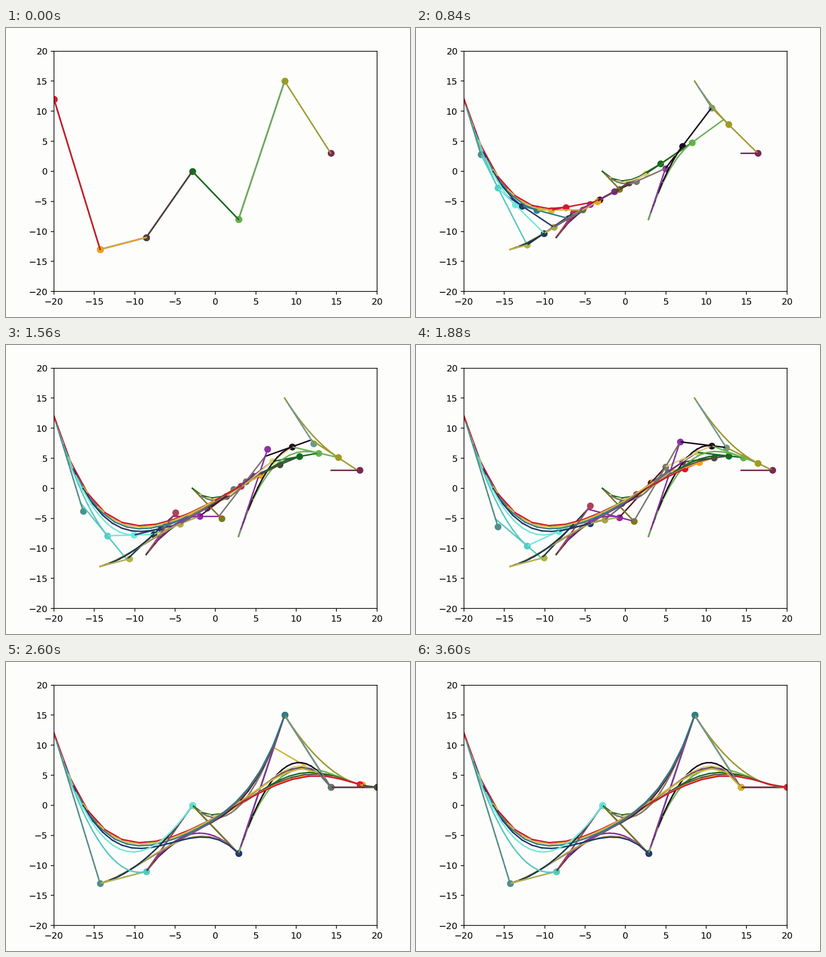
A matplotlib script for the animation above (3.64 s loop, 884x633 px).

```python
import numpy as np
import matplotlib.pyplot as plt
from matplotlib.animation import FuncAnimation
from matplotlib.collections import LineCollection
from matplotlib.colors import to_rgb

W, H, DPI = 884, 633, 128
SCALE = 1.1137          # point sizes relative to the default style
LINE_WIDTH = 1.6 * SCALE
FRAMES, INTERVAL = 91, 40
STEPS = 20              # values of t from 0 to 1

CONTROL = np.column_stack([np.linspace(-20, 20, 8),
                           [12, -13, -11, 0, -8, 15, 3, 3]])

# One row per level of the construction, one colour per moving point
COLORS = [
    ["#4a928a", "#b3b345", "#b04058", "#7f7a16", "#9030a8", "#6a9a90", "#7a2852"],
    ["#48d1c8", "#143a52", "#a020b0", "#7d766e", "#1f0a1f", "#a39b18"],
    ["#62f0dc", "#b0a840", "#5c1420", "#ddd470", "#62b848"],
    ["#1c3a78", "#70588a", "#7a2a88", "#0c7018"],
    ["#2a8088", "#647a6a", "#48483c"],
    ["#dcb61c", "#f5a414"],
    ["#ec0c28"],
]
COUNT = sum(map(len, COLORS))
TOTAL = COUNT * (STEPS - 1)

# Number of single-point updates done by a given frame
KEY_FRAMES = [0, 12, 30, 43, 47, 59, 65, 66]
KEY_UPDATES = [0, 112.1, 252.1, 343.2, 367.2, 473.6, 529.6, TOTAL]


def casteljau():
    """Paths of all points, level by level; each has shape (STEPS, 2)."""
    t = np.linspace(0, 1, STEPS)[:, None]
    levels = [[np.tile(p, (STEPS, 1)) for p in CONTROL]]
    while len(levels[-1]) > 1:
        prev = levels[-1]
        levels.append([(1 - t) * a + t * b for a, b in zip(prev, prev[1:])])
    return levels


def mute(color, amount=0.2):
    """The colour moved towards the grey of the same lightness."""
    rgb = np.array(to_rgb(color))
    return (1 - amount) * rgb + amount * (rgb @ [0.3, 0.59, 0.11])


class Mover:
    """A dot and the segment it slides along."""

    def __init__(self, ax, path, color, ends=None):
        self.path, self.ends = path, ends
        self.dot = ax.scatter([], [], s=36 * SCALE**2, color=color,
                              linewidths=1.5 * SCALE, zorder=1)
        self.link, = ax.plot([], [], color=mute(color), lw=LINE_WIDTH, zorder=1.8)

    def place(self, k, show_dot):
        self.dot.set_offsets(self.path[k])
        self.dot.set_visible(show_dot)
        if self.ends:
            a, b = self.ends
            self.link.set_data([a[k, 0], b[k, 0]], [a[k, 1], b[k, 1]])


fig = plt.figure(figsize=(W / DPI, H / DPI), dpi=DPI, facecolor="#fdfdfc")
left, right, top, bottom = 105, 811.5, 50.6, 577.2
ax = fig.add_axes([left / W, 1 - bottom / H, (right - left) / W, (bottom - top) / H],
                  facecolor="#fdfdfc")
ax.set(xlim=(-20, 20), ylim=(-20, 20),
       xticks=range(-20, 21, 5), yticks=range(-20, 21, 5))
ax.tick_params(labelsize=10 * SCALE, length=3.5 * SCALE,
               width=0.8 * SCALE, pad=3.5 * SCALE)
for spine in ax.spines.values():
    spine.set_linewidth(0.8 * SCALE)

levels = casteljau()
movers = []
for r, row in enumerate(COLORS, start=1):
    for i, color in enumerate(row):
        ends = (levels[r - 1][i], levels[r - 1][i + 1]) if r > 1 else None
        movers.append(Mover(ax, levels[r][i], color, ends))

# Trail pieces in the order they are laid down, so newer ones cover older ones
pieces = [m.path[k:k + 2] for k in range(STEPS - 1) for m in movers]
trails = LineCollection([], colors=[mute(c) for row in COLORS for c in row],
                        linewidths=LINE_WIDTH, capstyle="projecting", zorder=2)
ax.add_collection(trails, autolim=False)


def update(frame):
    done = np.interp(frame, KEY_FRAMES, KEY_UPDATES)
    step, current = divmod(int(done), COUNT)
    # The dot being moved is taken away shortly before it is set again
    swapping = done < TOTAL and done % 1 >= 0.5
    for n, mover in enumerate(movers):
        mover.place(step + (n < current), not (swapping and n == current))
    trails.set_segments(pieces[:int(done)])
    return []


anim = FuncAnimation(fig, update, frames=FRAMES, interval=INTERVAL,
                     repeat=True, repeat_delay=0, blit=False)
plt.show()
```
